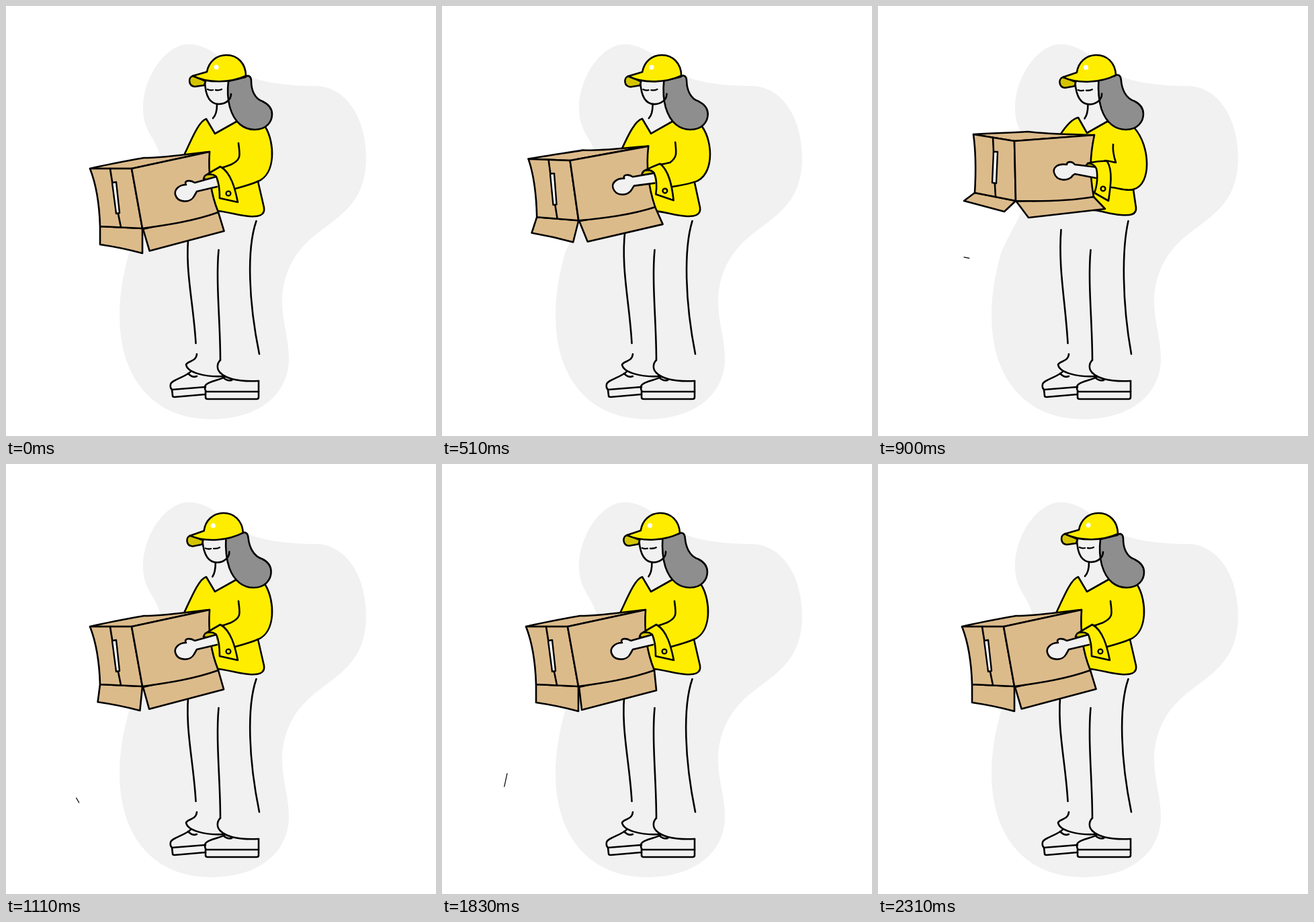
An HTML page with a canvas that plays this animation: 640x640 px, repeating every 2.34 s.

```html
<!DOCTYPE html>
<html lang="en">
<head>
<meta charset="utf-8">
<title>Shaking an empty box</title>
<style>
html, body { margin: 0; width: 100%; height: 100%; overflow: hidden; background: #fff; }
canvas { display: block; }
</style>
</head>
<body>
<canvas id="stage" width="640" height="640"></canvas>
<script>
const ctx = document.getElementById('stage').getContext('2d');
const LOOP = 2340;
const SKIN = '#f1f1f1', YELLOW = '#ffed00', SHADE = '#d3c400', CARD = '#dcbb8b', HAIR = '#8e8e8e';

const lerp = (a, b, k) => a + (b - a) * k;
const smooth = k => k * k * (3 - 2 * k);

// Value at time t from a flat list: time, value, time, value...
function track(t, keys, ease = smooth) {
  let i = 0;
  while (i < keys.length - 4 && t >= keys[i + 2]) i += 2;
  const k = Math.min(1, Math.max(0, (t - keys[i]) / (keys[i + 2] - keys[i])));
  return lerp(keys[i + 1], keys[i + 3], ease(k));
}

// Blend two paths that share the same commands
function mix(a, b, k) {
  const target = b.match(/[\d.]+/g);
  let i = 0;
  return a.replace(/[\d.]+/g, n => lerp(+n, +target[i++], k).toFixed(2));
}

function draw(d, fill, width = 2.6) {
  const path = new Path2D(d);
  if (fill) { ctx.fillStyle = fill; ctx.fill(path); }
  if (width) { ctx.lineWidth = width; ctx.stroke(path); }
}

function dot(x, y, r, fill, outlined) {
  ctx.beginPath();
  ctx.arc(x, y, r, 0, Math.PI * 2);
  ctx.fillStyle = fill;
  ctx.fill();
  ctx.lineWidth = 2.4;
  if (outlined) ctx.stroke();
}

const blob = 'M272 57C236 57 204 108 204 152C204 188 222 194 230 224C238 280 200 326 183 368C174 400 169 430 169 460C169 560 225 615 305 615C380 615 421 575 421 525C421 495 411 470 411 440C411 405 425 375 445 355C480 318 536 305 536 226C536 165 505 119 460 119C435 119 395 117 365 106C325 90 310 57 272 57Z';

const feet = [
  'M316.5 363C312 410 319 470 319 527',
  'M284 518C283 530 270 528 268 534C270 545 295 553 326 551',
  'M319 527C314 532 313 540 319 546C330 557 355 559 376 558',
  'M275 544C268 552 247 556 245 563C244 567 246 570 247 571L297 567',
  'M247 571L248 580Q248 582 251 582L297 578',
  'M271 547C275 551 280 553 284 551',
  'M326 552C318 557 297 559 296 567C296 571 297 573 298 574H376V558',
  'M297 574V582Q297 585 300 585H373Q376 585 376 582V574',
  'M323 552C326 557 332 558 336 557'
];

// Each moving part: box low, first lift, second lift, and low while leaning if it differs
const torso = [
  'M265 222C276 199 287 171 298 168L311 190L343 172L386 180C400 203 402 250 375 261L384 300C386 312 375 314 362 313C345 312 332 306 306 304Z',
  'M280 190C285 181 291 171 298 168L311 190L343 172L390 178C412 202 412 260 377 264L384 300C386 312 375 314 362 313C345 312 340 308 326 306Z',
  'M271 192C280 178 289 168 298 166L311 189L341 172L382 182C405 208 408 266 380 273L384 300C385 311 375 312 362 311C345 310 335 305 321 304Z',
  'M258 222C267 196 284 168 298 167L311 189L341 172L386 181C402 205 402 251 376 262L384 299C386 311 375 313 362 312C345 311 332 305 307 303Z'
];
const boxTop = [
  'M125 242C150 236 178 231 205 226C238 226 270 220 303 217L187 242Z',
  'M137 194C165 192 192 191 219 188C250 191 285 189 317 189L199 202Z',
  'M142 191C170 189 195 189 223 187C255 191 290 191 322 192L203 201Z'
];
const boxSide = [
  'M125 242L187 242L203 331L140 328C139 295 134 265 125 242Z',
  'M137 194L199 202L204 292L144 282C144 250 145 225 137 194Z',
  'M142 191L203 201L205 290L144 278C146 245 146 220 142 191Z'
];
const boxFront = [
  'M187 242L303 217C301 245 303 275 316 307C280 320 240 326 203 331Z',
  'M199 202L317 189C310 220 315 250 320 281C280 291 240 292 204 292Z',
  'M203 201L322 192C315 225 315 250 321 284C280 291 240 291 205 290Z'
];
const seam = [
  'M155 242C159 270 165 300 171 329',
  'M167 199C170 230 171 255 173 287',
  'M171 196C173 230 173 255 175 284'
];
const handle = [
  'M158 263L164 262L169 308L164 309Z',
  'M168 219L174 219L174 266L169 266Z',
  'M172 217L178 217L176 264L170 263Z'
];
const hinges = ['140 328 203 331 316 307', '144 282 204 292 320 281', '144 278 205 290 321 284'];
const armLines = [
  'M375 261C366 265 352 269 341 272M346 204C348 222 351 228 335 236C330 238 325 240 319 241',
  'M377 264C368 266 355 263 345 263M350 200C350 208 350 217 350 226C345 225 340 224 335 225',
  'M380 273C370 276 358 271 348 270M350 206C349 215 351 224 354 233C348 232 342 230 338 230'
];
const opening = [
  'M294 257C296 248 309 248 313 255L312 262Z',
  'M306 235C308 227 319 228 322 236L321 243Z',
  'M309 239C311 232 321 233 325 241L324 248Z'
];
const cuff = [
  'M299 251C305 247 312 243 319 239C335 248 341 272 345 292L318 286C318 274 317 262 313 254C309 250 304 250 299 251Z',
  'M311 229C319 227 329 225 337 225C346 238 346 262 344 283L319 267C324 260 325 245 322 236C320 231 315 229 311 229Z',
  'M312 234C322 232 333 230 341 231C350 245 346 270 343 290L322 278C327 266 327 250 325 242C322 236 317 234 312 234Z'
];
const hand = [
  'M313 254L281 263C275 259 267 259 267 264L268 266C258 266 250 273 252 281C256 294 275 293 280 283L284 276L314 269',
  'M323 236L291 234C284 229 279 231 279 235L279 235C267 233 258 238 260 246C264 261 283 260 288 250L290 248L322 251',
  'M326 240L293 236C288 230 282 232 281 235L281 236C268 234 260 240 262 248C266 262 285 261 290 252L293 250L324 256'
];
const button = ['331 279', '334 266', '335 272'];

const hairUpright = 'M331 112C330 120 329 135 333 150C340 175 355 184 370 184C388 184 396 172 396 161C396 150 388 145 382 142C370 138 365 125 365 112C365 104 360 102 356 106Z';
const hairTilted = 'M326 109C325 130 328 145 332 156C340 176 354 184 368 184C385 184 394 172 394 160C394 150 387 144 381 141C367 137 361 122 359 110C358 101 354 100 349 102Z';

// Falling dust: time, x, y, length, angle, speed x, speed y, start, end
const dust = [
  [900, 132, 374, 8, 0.2, -0.12, 0.6, 860, 1200],
  [1410, 125, 507, 8, -0.08, -0.1, 0.35, 1180, 1600],
  [1410, 108, 464, 19, 0.85, -0.08, 0.4, 1200, 1670],
  [1830, 95, 470, 20, 1.78, -0.15, 0.35, 1640, 2120]
];

function drawHead(tilt) {
  draw(mix('M314 147C314 157 312 163 308 167', 'M311 147C311 157 310 163 307 168', tilt));
  draw(mix(hairUpright, hairTilted, tilt), HAIR);
  ctx.save();
  ctx.translate(325, 180);
  ctx.rotate(-0.075 * tilt);
  ctx.translate(-325, -180);
  draw('M296 113C297 138 306 146 317 146C326 146 335 140 335 131');
  draw('M300 124Q304 126 308 125M312 125Q317 126 321 124', null, 2.3);
  draw('M278 104C271 106 271 119 281 120L295 118L297 112C290 109 285 106 278 104Z', SHADE);
  draw('M278 104L299 98C302 82 314 73 328 73C345 73 357 86 357 104C335 114 302 116 278 104Z', YELLOW);
  dot(313, 91, 3.5, '#fff');
  ctx.restore();
}

// Flaps swing out sideways while their hanging height shrinks ever faster
function drawFlaps([ax, ay, bx, by, cx, cy], openLeft, openRight) {
  const flap = (x, y, open, x0, x1, y0, y1) => [x + lerp(x0, x1, open), y + lerp(y0, y1, open * open)];
  const leftOuter = flap(ax, ay, openLeft, 0, -16, 27, 12);
  const leftInner = flap(bx, by, openLeft, 0, -17, 37, 16);
  const leftBend = flap((ax + bx) / 2, (ay + by) / 2, openLeft, 0, -16, 30, 14);
  const rightInner = flap(bx, by, openRight, 5, 19, 35, 25);
  const rightOuter = flap(cx, cy, openRight, 3, 17, 30, 18);
  draw(`M${ax} ${ay}L${bx} ${by}L${leftInner}Q${leftBend} ${leftOuter}Z`, CARD);
  draw(`M${bx + 1} ${by + 1}L${rightInner}L${rightOuter}L${cx} ${cy}Z`, CARD);
}

function drawDust(t) {
  for (const [at, x, y, length, angle, vx, vy, start, end] of dust) {
    if (t < start || t > end) continue;
    const dt = t - at, a = angle + dt * 0.004;
    const size = length / 2 * Math.min(1, (end - t) / 60);
    const px = x + vx * dt, py = y + vy * dt;
    const dx = Math.cos(a) * size, dy = Math.sin(a) * size;
    draw(`M${px - dx} ${py - dy}L${px + dx} ${py + dy}`, null, 1.2);
  }
}

function render(t) {
  const lift = track(t, [0, 0, 320, 1, 620, 0, 640, 0.04, 880, 1, 920, 1, 1100, 0]);
  const lean = track(t, [420, 0, 660, 1, 900, 1, 1130, 0]);
  const tilt = track(t, [360, 0, 1400, 1, 2310, 0], k => k);
  const openLeft = track(t, [0, 0, 330, 0.25, 660, 0.65, 900, 1, 1130, 0.2, 1260, 0]);
  const openRight = track(t, [0, 0.4, 330, 0.2, 660, 0.9, 900, 1, 1130, 0.35, 1410, 0.3, 1800, 0, 2310, 0.4]);
  const pose = ([low, first, second, leaning = low]) =>
    mix(mix(low, leaning, lean), t < 630 ? first : second, lift);
  const numbers = part => pose(part).split(' ').map(Number);

  ctx.fillStyle = '#fff';
  ctx.fillRect(0, 0, 640, 640);
  ctx.lineCap = ctx.lineJoin = 'round';
  ctx.strokeStyle = '#000';

  draw(blob, SKIN, 0);
  feet.forEach(d => draw(d));
  draw(mix('M272.5 333C265 390 279 440 282.5 502', 'M272.5 333C268 390 279 440 282.5 502', lean));
  draw(mix('M372.5 320C358 362 361 440 377 518', 'M372.5 320C363 362 363 440 377 518', lean));
  draw(pose(torso), YELLOW);
  drawHead(tilt);

  drawFlaps(numbers(hinges), openLeft, openRight);
  for (const part of [boxTop, boxSide, boxFront]) draw(pose(part), CARD);
  draw(pose(seam));
  draw(pose(handle), '#fff', 2.4);

  draw(pose(armLines));
  draw(pose(opening), SHADE);
  draw(pose(hand), SKIN);
  draw(pose(cuff), YELLOW);
  dot(...numbers(button), 3.4, YELLOW, true);
  drawDust(t);
}

function loop() {
  render(performance.now() % LOOP);
  requestAnimationFrame(loop);
}
loop();
</script>
</body>
</html>
```
